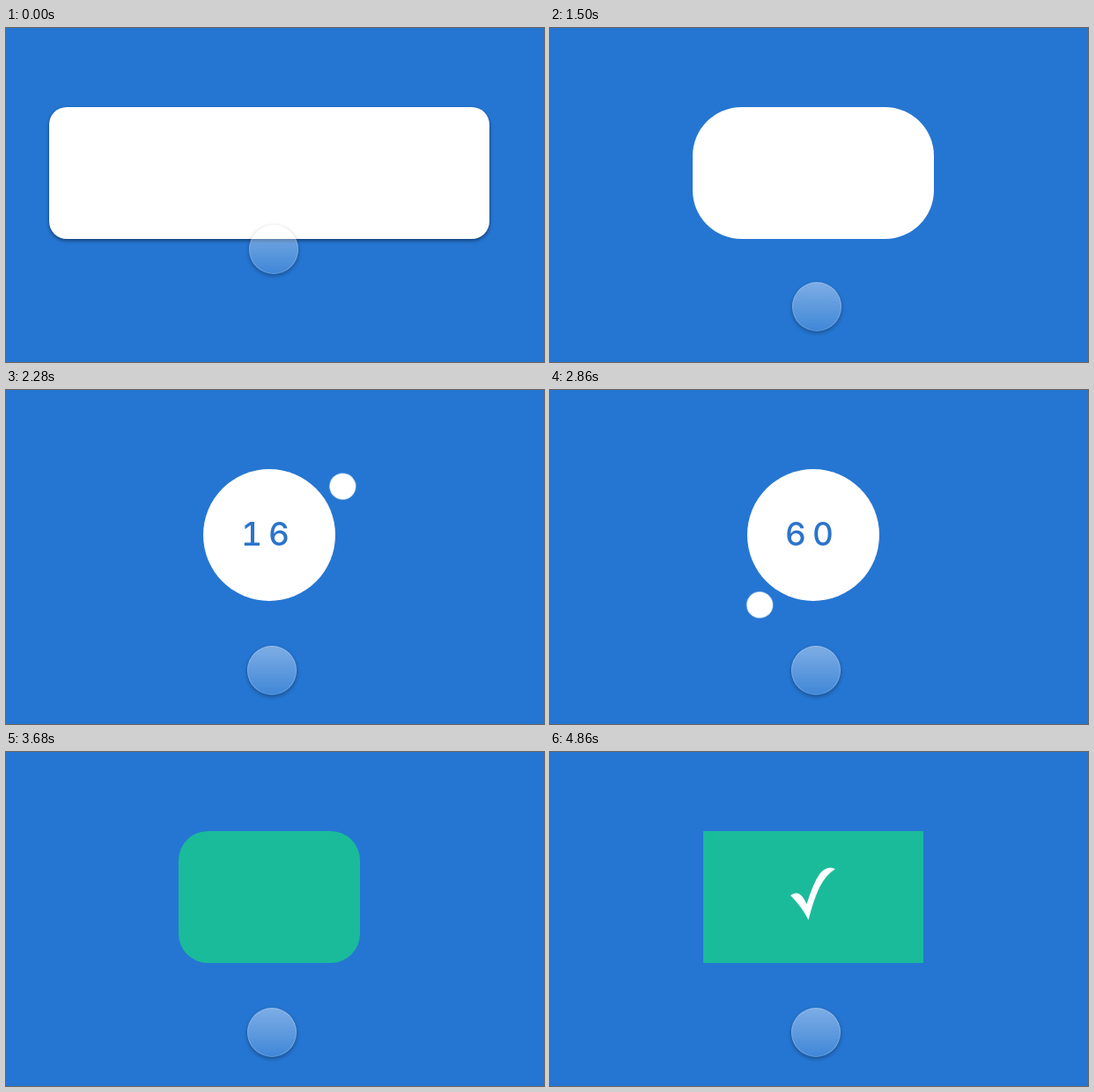
Write an HTML page without scripts that moves like this. It is 611 px wide and 380 px high and loops after 4880 ms.

```html
<!DOCTYPE html>
<html lang="en">
<head>
<meta charset="utf-8">
<title>Submit button</title>
<style>
@property --count {
  syntax: "<integer>";
  inherits: true;
  initial-value: 0;
}
html, body {
  margin: 0;
  width: 100%;
  height: 100%;
  overflow: hidden;
  background: #2576d2;
}
.stage {
  position: relative;
  width: 611px;
  height: 380px;
  overflow: hidden;
  background: #2576d2;
}
.stage * {
  position: absolute;
  box-sizing: border-box;
  animation: 4880ms linear infinite;
}
.stage .card {
  top: 90px;
  height: 150px;
  animation-name: card, shadow;
}
.stage .counter {
  left: 223px;
  top: 90px;
  width: 150px;
  text-align: center;
  font: 500 37px/147px Inter, "Open Sans", sans-serif;
  font-variant-numeric: tabular-nums;
  letter-spacing: 7px;
  color: #2b74cb;
  counter-reset: progress var(--count);
  animation-name: count, counter-show;
}
.counter::after { content: counter(progress); }
.stage .orbit {
  left: 299px;
  top: 165px;
  width: 0;
  height: 0;
  animation-name: orbit, dot-show;
}
.dot {
  left: -15px;
  top: -115px;
  width: 30px;
  height: 30px;
  border-radius: 50%;
  background: #fff;
}
.stage .check {
  left: 0;
  top: 0;
  animation-name: check;
}
.stage .pointer {
  left: -28px;
  top: -28px;
  width: 56px;
  height: 56px;
  border-radius: 50%;
  background: linear-gradient(#ffffff69, #ffffff20);
  box-shadow: 0 2px 5px #0005, inset 0 0 0 1px #ffffff30;
  animation-name: pointer;
}

/* bar -> circle -> green rectangle */
@keyframes card {
  0%, 21.311% { left: 49px; width: 500px; border-radius: 20px; background: #fff; animation-timing-function: ease-in; }
  33.607%, 66.8% { left: 224px; width: 150px; border-radius: 75px; background: #fff; }
  66.803% { left: 224px; width: 150px; border-radius: 75px; background: #1abb9b; animation-timing-function: ease-in; }
  79.098%, 100% { left: 174px; width: 250px; border-radius: 0; background: #1abb9b; }
}
@keyframes shadow {
  0%, 20.5% { box-shadow: 0 2px 4px #0007; }
  24% { box-shadow: 0 1px 2px #0006; }
  29%, 100% { box-shadow: 0 0 0 #0000; }
}
@keyframes count {
  0%, 36.885% { --count: 0; animation-timing-function: ease-in; }
  66.393%, 100% { --count: 100; }
}
@keyframes counter-show {
  0%, 36.88% { opacity: 0; }
  36.885%, 66.8% { opacity: 1; }
  66.803%, 100% { opacity: 0; }
}
@keyframes orbit {
  0%, 36.885% { transform: rotate(0deg); animation-timing-function: ease-in; }
  66.393%, 100% { transform: rotate(360deg); }
}
@keyframes dot-show {
  0%, 33.607% { opacity: 0; }
  36.885%, 66.803% { opacity: 1; }
  70.902%, 100% { opacity: 0; }
}
@keyframes check {
  0%, 79.098% { opacity: 0; transform: translateY(14px); }
  83.197% { opacity: 1; transform: translateY(6px); }
  88.525% { opacity: 1; transform: translateY(2px); }
  93% { opacity: 1; transform: translateY(.7px); }
  100% { opacity: 1; transform: translateY(0); }
}
@keyframes pointer {
  0% { transform: translate(304px, 252px); animation-timing-function: ease-in-out; }
  11.066%, 13.115% { transform: translate(305px, 138px); animation-timing-function: ease-in-out; }
  21.721% { transform: translate(305px, 223px); }
  23.77% { transform: translate(305px, 224px); animation-timing-function: ease-in-out; }
  30.738% { transform: translate(303px, 317px); }
  34.426%, 100% { transform: translate(302px, 319px); }
}
</style>
</head>
<body>
<div class="stage">
  <div class="card"></div>
  <div class="counter"></div>
  <div class="orbit"><div class="dot"></div></div>
  <svg class="check" width="611" height="380" viewBox="0 0 611 380">
    <path fill="#fff" d="M273 163Q277 160 280.500 160.500Q286 161 291.500 173Q299 149 306 139Q311 132 318 131.500Q321 131.500 324 133Q313 140 306 154Q299 169 293.500 191Q286 176 273 163Z"/>
  </svg>
  <div class="pointer"></div>
</div>
</body>
</html>
```
